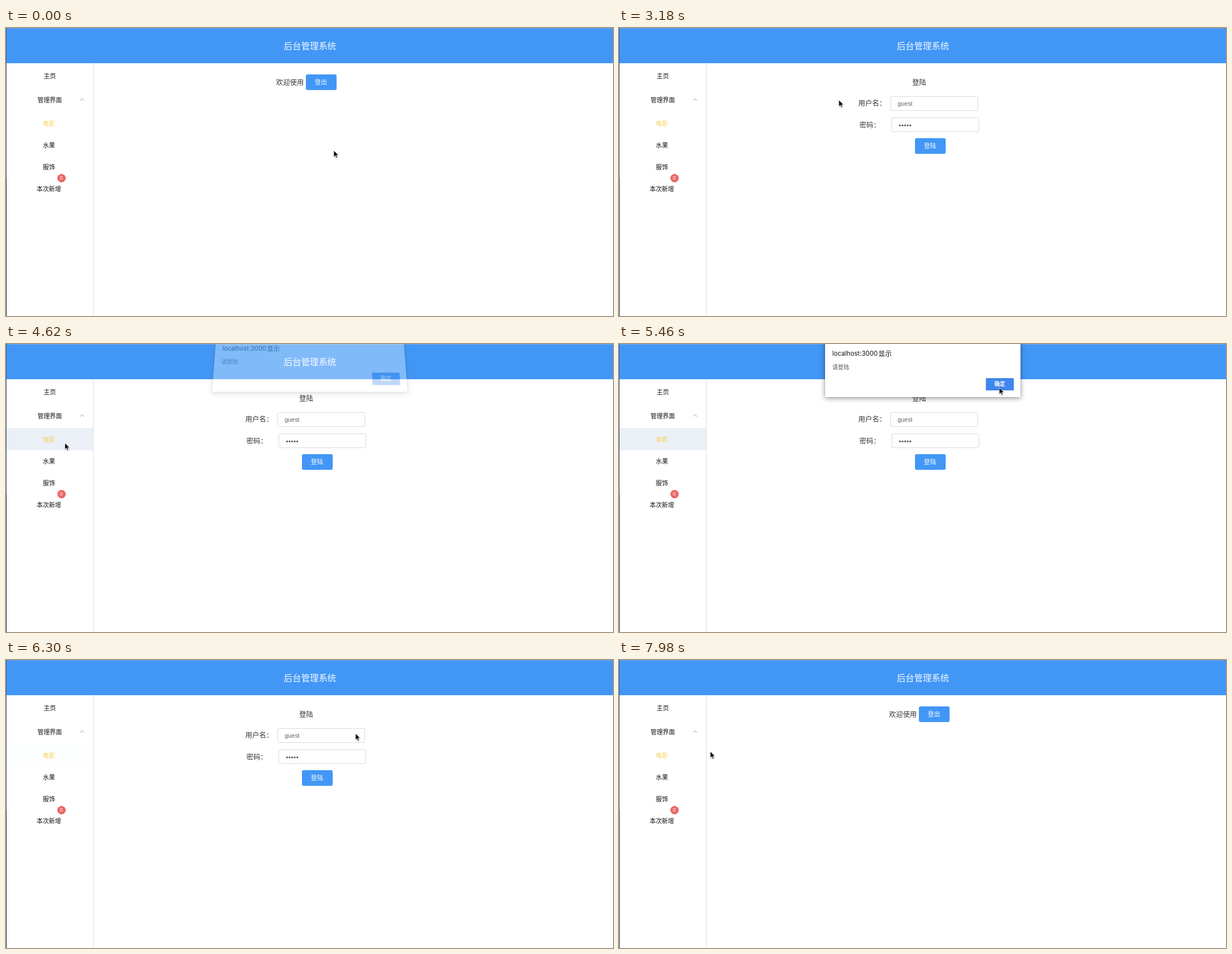
These frames come from a looping animation (1087x515 px, 8000 ms). An HTML page:

```html
<!DOCTYPE html>
<html lang="zh-CN">
<head>
<meta charset="utf-8">
<style>
  html, body { margin: 0; width: 100%; height: 100%; overflow: hidden; background: #fff; }
  #stage { position: absolute; left: 0; top: 0; width: 1087px; height: 515px; overflow: hidden;
    font-family: "Noto Sans CJK SC", "Noto Sans CJK", sans-serif; }
  #stage div, #stage svg { position: absolute; box-sizing: border-box; }
  .label { white-space: nowrap; line-height: 20px; height: 20px; font-size: 10.9px; color: #111; }
  .body { font-size: 12.45px; color: #303338; }
  .button { width: 55px; height: 28px; border-radius: 3px; background: #4297f6; color: #fff;
    font-size: 10.9px; line-height: 27px; text-align: center; }
  .field { width: 157px; height: 26px; border: 1px solid #d6d9df; border-radius: 3px; background: #fff;
    padding-left: 12px; line-height: 24px; font: 10.9px/24px "Liberation Sans", sans-serif; color: #606266; }
  #header { left: 0; top: 0; width: 1087px; height: 63px; background: #4297f6; border-top: 1px solid #77a9dc; }
  #divider { left: 156px; top: 63px; width: 1px; height: 452px; background: #e0e1e4; }
  #edge { left: 0; top: 0; width: 1px; height: 515px;
    background: linear-gradient(#3a5a84 268px, #1c2430 268px); }
  #row { left: 0; top: 150px; width: 156px; height: 40px; background: #ebf0f7; }
  #badge { left: 91.5px; top: 260.5px; width: 15px; height: 15px; border-radius: 50%; background: #eb6666;
    color: #fff; font: 9.3px/15px "Liberation Sans", sans-serif; text-align: center; }
  #sheet { left: 369px; top: 0; width: 350px; height: 130px; perspective: 300px; perspective-origin: 50% 0; }
  #dialog { left: 0; top: -40px; width: 350px; height: 135px; background: #fff; transform-origin: 50% 100%;
    box-shadow: 0 2px 9px rgba(0, 0, 0, .42), 0 0 1px rgba(0, 0, 0, .5); }
  #confirm { left: 288px; top: 101px; width: 50px; height: 22px; border-radius: 1px; background: #3f87ec;
    color: #fff; font-size: 9.8px; font-weight: 700; line-height: 21px; text-align: center; }
  #cursor { left: 0; top: 0; overflow: visible; filter: drop-shadow(0 1px 1px rgba(0, 0, 0, .3)); }
</style>
</head>
<body>
<div id="stage">
  <div id="header"></div>
  <div class="label" style="left:497.5px;top:21px;font-size:15.6px;font-weight:300;color:#f4f9ff">后台管理系统</div>
  <div id="divider"></div>
  <div id="row"></div>
  <div class="label" style="left:67.5px;top:75px">主页</div>
  <div class="label" style="left:56.5px;top:118px">管理界面</div>
  <svg style="left:132px;top:125px" width="9" height="6"><path d="M.8 4.8 4.2 1.3 7.6 4.8" fill="none" stroke="#999ca2"/></svg>
  <div class="label" style="left:66px;top:160px;color:#f6d04d">电影</div>
  <div class="label" style="left:66px;top:199px">水果</div>
  <div class="label" style="left:66px;top:238px">服饰</div>
  <div class="label" style="left:55px;top:277px">本次新增</div>
  <div id="badge">0</div>

  <div id="welcome">
    <div class="label body" style="left:483.5px;top:87px">欢迎使用</div>
    <div class="button" style="left:536.5px;top:83px">登出</div>
  </div>

  <div id="login">
    <div class="label body" style="left:525px;top:87px">登陆</div>
    <div class="label body" style="left:428.5px;top:124px">用户名：</div>
    <div class="field" style="left:486px;top:122px">guest</div>
    <div class="label body" style="left:430.5px;top:163px">密码：</div>
    <div class="field" style="left:488px;top:160px"></div>
    <svg style="left:500px;top:170px" width="26" height="8" fill="#55575b">
      <circle cx="3.2" cy="4.2" r="1.6"/><circle cx="7.8" cy="4.2" r="1.6"/><circle cx="12.4" cy="4.2" r="1.6"/>
      <circle cx="17" cy="4.2" r="1.6"/><circle cx="21.6" cy="4.2" r="1.6"/>
    </svg>
    <div class="button" style="left:529.5px;top:197px">登陆</div>
  </div>

  <div id="sheet">
    <div id="dialog">
      <div class="label" style="left:13px;top:47px;font:11.5px/20px Inter,sans-serif">localhost:3000</div>
      <div class="label" style="left:95.5px;top:47px;font-size:12px">显示</div>
      <div class="label" style="left:13px;top:71px;font-size:10.1px;color:#555">请登陆</div>
      <div id="confirm">确定</div>
    </div>
  </div>

  <div id="edge"></div>
  <svg id="cursor" width="16" height="18" stroke-linejoin="round">
    <path id="arrow" d="M0 0V11.6L2.7 9.1 4.4 13.2 6.4 12.3 4.7 8.4H8.3Z" fill="#000" stroke="#fff" stroke-width=".8"/>
    <path id="hand" d="M-1 1.2Q-1-.2 .2-.2 1.4-.2 1.5 1.2L2 4.6Q3.2 3.8 4 5 5.2 4.3 6 5.4 7.4 5 7.6 6.6 7.8 9.5 6.4 11.6V13H.8Q.2 11.2-1.8 9.2-3.4 7.2-2.6 6.4-1.6 5.8-.2 7.4Z" fill="#fff" stroke="#111"/>
  </svg>
</div>
<script>
const LOOP = 8000, STEP = 60;
const LOGOUT = 2220, LOGIN = 6840;
const $ = id => document.getElementById(id);
const ramp = (t, start, length) => Math.min(1, Math.max(0, (t - start) / length));
const smooth = p => p * p * (3 - 2 * p);
const within = (t, spans) => spans.some(([from, to]) => t >= from && t < to);
const show = (id, on) => { $(id).style.display = on ? "" : "none"; };

// Pointer stops: time, x, y
const path = [
  [0, 587, 219], [660, 587, 219], [1560, 559.5, 101], [2640, 559.5, 101],
  [3960, 105.5, 177], [4680, 105.5, 177], [5340, 681, 78], [5700, 681, 78],
  [5880, 684.5, 72], [6000, 684.5, 72], [6660, 549, 209.5], [7140, 549, 209.5],
  [7980, 163.5, 163.5]
];
const handSpans = [[1860, 2220], [4320, 4620], [5820, 6000], [6660, 6840]];

function pointerAt(t) {
  const i = Math.max(1, path.findIndex(stop => stop[0] >= t));
  const [t0, x0, y0] = path[i - 1], [t1, x1, y1] = path[i];
  const p = smooth(ramp(t, t0, t1 - t0));
  return [x0 + (x1 - x0) * p, y0 + (y1 - y0) * p];
}

function hoverAt(t) {
  if (t >= 7560) return 0;
  return ramp(t, 3780, 300) * (1 - .88 * ramp(t, 6000, 300));
}

function render(t) {
  const loggedOut = t >= LOGOUT && t < LOGIN;
  show("login", loggedOut);
  show("welcome", !loggedOut);
  $("row").style.opacity = hoverAt(t);

  const closing = ramp(t, 5760, 180);
  const hidden = Math.max(1 - ramp(t, 4560, 180), closing);
  show("sheet", hidden < 1);
  $("dialog").style.opacity = 1 - hidden;
  $("dialog").style.transform = hidden ? `translateY(${-14 * hidden}px) rotateX(${11.4 * hidden}deg)` : "none";

  const [x, y] = pointerAt(t);
  const hand = within(t, handSpans);
  $("cursor").style.transform = `translate(${x}px, ${y}px)`;
  show("hand", hand);
  show("arrow", !hand);
}

function tick() {
  const t = performance.now() % LOOP;
  render(Math.floor(t / STEP) * STEP);
  requestAnimationFrame(tick);
}
tick();
</script>
</body>
</html>
```
